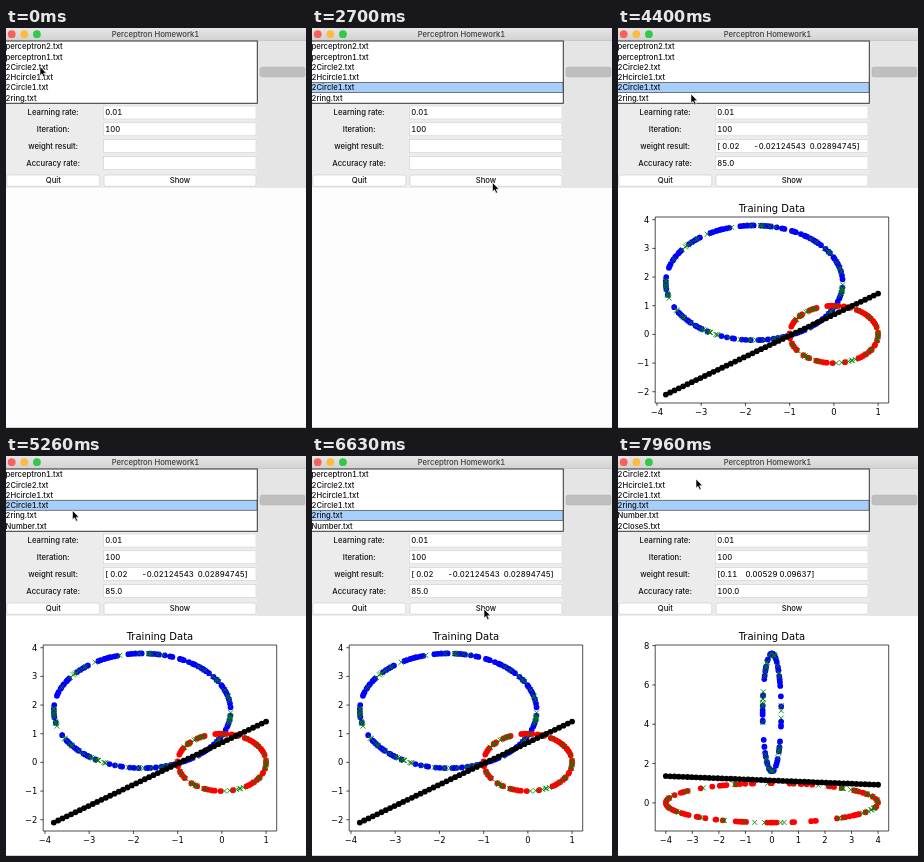
Recreate the animation shown at these times as an HTML page. Size 300 by 400 pixels, loop 8000 ms.

```html
<!DOCTYPE html>
<html lang="en">
<head>
<meta charset="utf-8">
<title>Perceptron Homework1</title>
<style>
html, body { margin: 0; width: 100%; height: 100%; overflow: hidden; background: #fdfdfd; }
svg { display: block; width: 100vw; height: 100vh; }
text {
  font: 500 7.7px Inter, "Liberation Sans", sans-serif;
  font-variant-numeric: tabular-nums;
  fill: #111;
  white-space: pre;
}
.plot text { font: 8.33px "DejaVu Sans", sans-serif; fill: #000; }
.plot text.title { font-size: 10px; }
.mid { text-anchor: middle; }
.end { text-anchor: end; }
</style>
</head>
<body>
<svg id="stage" viewBox="0 0 300 400">
  <defs>
    <linearGradient id="bar" x2="0" y2="1">
      <stop offset="0" stop-color="#e6e6e6"/>
      <stop offset="1" stop-color="#d2d2d2"/>
    </linearGradient>
  </defs>
</svg>
<script>
const LOOP = 8000;
const ITEMS = ["perceptron2", "perceptron1", "2Circle2", "2Hcircle1", "2Circle1", "2ring", "Number", "2CloseS"];
const ROWS = 6, ROW_H = 10.25;
const AXES = { left: 37.2, right: 270.7, top: 189, bottom: 375 };
const RESULTS = [
  ["", ""],
  ["[ 0.02       -0.02124543  0.02894745]", "85.0"],
  ["[0.11    0.00529 0.09637]", "100.0"]
];

// Hard changes: what each moment sets
const EVENTS = [
  { at: 0, first: 0, pick: -1, run: 0 },
  { at: 1760, pick: 4 },
  { at: 2900, run: 1 },
  { at: 4900, first: 1 },
  { at: 5480, pick: 5 },
  { at: 6700, run: 2 },
  { at: 7600, first: 2 }
];

// Pointer moves: start, end, target x and y
const HOME = [34, 38.5];
const MOVES = [
  [60, 300, 33, 40],
  [500, 760, 32, 52],
  [960, 1400, 32, 57.5],
  [1800, 2440, 180.5, 154.5],
  [3050, 3900, 73, 66],
  [4700, 5200, 66.5, 54.5],
  [5500, 6000, 145, 141],
  [6000, 6250, 172, 153],
  [6740, 7150, 78, 26.5],
  [7500, 7700, 78, 23]
];

const stage = document.getElementById("stage");

function add(parent, tag, attrs, content) {
  const el = document.createElementNS("http://www.w3.org/2000/svg", tag);
  for (const key in attrs) el.setAttribute(key, attrs[key]);
  if (content !== undefined) el.textContent = content;
  parent.appendChild(el);
  return el;
}
const box = (x, y, width, height, fill, more) =>
  add(stage, "rect", { x, y, width, height, fill, ...more });
const label = (x, y, content, cls = "") =>
  add(stage, "text", { x, y, class: cls }, content);
const range = (from, to, step = 1) =>
  Array.from({ length: (to - from) / step + 1 }, (_, i) => from + i * step);

function seeded(seed) {
  return () => (seed = (seed * 16807) % 2147483647) / 2147483647;
}

// Window
box(0, 0, 300, 160, "#ececec");
box(251, 12, 49, 148, "#e5e5e5");
box(0, 0, 300, 12.5, "url(#bar)");
box(0, 12, 300, 0.6, "#bdbdbd");
["#fc605b", "#fdbc40", "#34c84a"].forEach((fill, i) =>
  add(stage, "circle", { cx: 5.7 + i * 12.6, cy: 6.2, r: 3.9, fill }));
label(149.5, 9, "Perceptron Homework1", "mid").style.fill = "#3c3c3c";
box(254, 39, 45, 10, "#bfbfbf", { rx: 2, stroke: "#b2b2b2", "stroke-width": 0.5 });
box(0, 399, 300, 1, "#d4d4d4");

function entry(row, name, value) {
  const y = 78 + row * 16.8;
  label(47, y + 9.4, name, "mid");
  box(97.5, y, 152.5, 13, "#fff", { stroke: "#cfcfcf", "stroke-width": 0.6 });
  return label(99.3, y + 9.1, value);
}
entry(0, "Learning rate:", "0.01");
entry(1, "Iteration:", "100");
const weightText = entry(2, "weight result:", "");
const rateText = entry(3, "Accuracy rate:", "");

function button(x, width, name) {
  box(x, 147, width, 11.3, "#fff", { rx: 2, stroke: "#c6c6c6", "stroke-width": 0.6 });
  label(x + width / 2, 155.4, name, "mid");
}
button(0.8, 93, "Quit");
button(98, 152, "Show");

// File list
box(-1, 13, 252.3, 62.3, "#fff", { stroke: "#333", "stroke-width": 1 });
const pickBar = box(-1, 0, 252, 10, "#a8cffb", { stroke: "#444", "stroke-width": 0.7 });
const rowTexts = range(0, ROWS - 1).map(i => label(-0.5, 21.3 + i * ROW_H, ""));

// Charts
function chart(xLim, yLim, xTicks, yTicks) {
  const { left, right, top, bottom } = AXES;
  const g = add(stage, "g", { class: "plot" });
  const px = v => left + (v - xLim[0]) / (xLim[1] - xLim[0]) * (right - left);
  const py = v => bottom - (v - yLim[0]) / (yLim[1] - yLim[0]) * (bottom - top);
  const minus = v => String(v).replace("-", "\u2212");
  add(g, "rect", { x: 0, y: 160, width: 300, height: 239, fill: "#fff" });
  add(g, "text", { x: 154, y: 184.3, class: "mid title" }, "Training Data");
  let ticks = "";
  for (const v of xTicks) {
    ticks += `M${px(v)} ${bottom}v2.9`;
    add(g, "text", { x: px(v), y: bottom + 11.8, class: "mid" }, minus(v));
  }
  for (const v of yTicks) {
    ticks += `M${left} ${py(v)}h-2.9`;
    add(g, "text", { x: left - 5.8, y: py(v) + 3.1, class: "end" }, minus(v));
  }
  add(g, "path", {
    d: `M${left} ${top}H${right}V${bottom}H${left}Z${ticks}`,
    fill: "none", stroke: "#000", "stroke-width": 0.7
  });
  return { g, px, py };
}

function dots(c, points, stroke) {
  const d = points.map(([x, y]) => `M${c.px(x)} ${c.py(y)}h0`).join("");
  add(c.g, "path", { d, stroke, "stroke-width": 5.8, "stroke-linecap": "round" });
}

function crosses(c, points) {
  const d = points.map(([x, y]) =>
    `M${c.px(x) - 2.5} ${c.py(y) - 2.5}l5 5m0 -5l-5 5`).join("");
  add(c.g, "path", { d, stroke: "#008000", "stroke-width": 0.85, fill: "none" });
}

// Random points on an ellipse: two thirds train (dots), one third test (crosses).
function ring(c, cy, count, color, seed, cx, rx, ry) {
  const rand = seeded(seed);
  const points = range(1, count).map(() => {
    const a = rand() * 2 * Math.PI;
    return [cx + rx * Math.cos(a), cy + ry * Math.sin(a)];
  });
  const split = Math.round(count * 2 / 3);
  dots(c, points.slice(0, split), color);
  crosses(c, points.slice(split));
}

function boundary(c, from, to, f) {
  const points = range(0, 49).map(i => from + (to - from) * i / 49).map(x => [x, f(x)]);
  dots(c, points, "#000");
}

const circles = chart([-4.04, 1.24], [-2.393, 4.095], range(-4, 1), range(-2, 4));
ring(circles, 1.8, 240, "#00f", 7741, -1.8, 2, 2);
ring(circles, 0, 130, "#f00", 41233, 0, 1, 1);
boundary(circles, -3.8, 1, x => (0.02 + 0.02124543 * x) / 0.02894745);

const rings = chart([-4.4, 4.4], [-1.43, 8.03], range(-4, 4), range(0, 8, 2));
ring(rings, 4.6, 120, "#00f", 91357, 0, 0.35, 3);
ring(rings, 0, 150, "#f00", 20249, 0, 4, 1);
boundary(rings, -4, 4, x => (0.11 - 0.00529 * x) / 0.09637);

// Pointer
const pointer = add(stage, "g", {});
const arrow = add(pointer, "path", {
  d: "M0 0V9.2L2 7.3L3.5 10.7L5.1 10L3.6 6.7H6.5Z",
  fill: "#000", stroke: "#fff", "stroke-width": 0.6
});
const beam = add(pointer, "path", {
  d: "M-2 -4.5Q0 -4.5 0 -3.3Q0 -4.5 2 -4.5M0 -3.5V3.5M-2 4.5Q0 4.5 0 3.3Q0 4.5 2 4.5M-1 1.5H1",
  fill: "none", stroke: "#222", "stroke-width": 0.9
});

function pointerAt(t) {
  let [x, y] = HOME;
  for (const [start, end, toX, toY] of MOVES) {
    const u = Math.min(1, Math.max(0, (t - start) / (end - start)));
    const e = u * u * (3 - 2 * u);
    x += (toX - x) * e;
    y += (toY - y) * e;
  }
  return [x, y];
}

const show = (el, on) => el.setAttribute("display", on ? "inline" : "none");

function draw(t) {
  const { first, pick, run } = Object.assign({}, ...EVENTS.filter(e => e.at <= t));
  rowTexts.forEach((el, i) => { el.textContent = ITEMS[first + i] + ".txt"; });
  show(pickBar, pick >= 0);
  pickBar.setAttribute("y", 13.5 + (pick - first) * ROW_H);

  [weightText.textContent, rateText.textContent] = RESULTS[run];
  show(circles.g, run === 1);
  show(rings.g, run === 2);

  const [x, y] = pointerAt(t);
  const overEntry = x > 97 && x < 250 && y > 78 && y < 142;
  pointer.setAttribute("transform", `translate(${x} ${y})`);
  show(arrow, !overEntry);
  show(beam, overEntry);
}

const start = performance.now();
function tick() {
  draw((performance.now() - start) % LOOP);
  requestAnimationFrame(tick);
}
tick();
</script>
</body>
</html>
```
